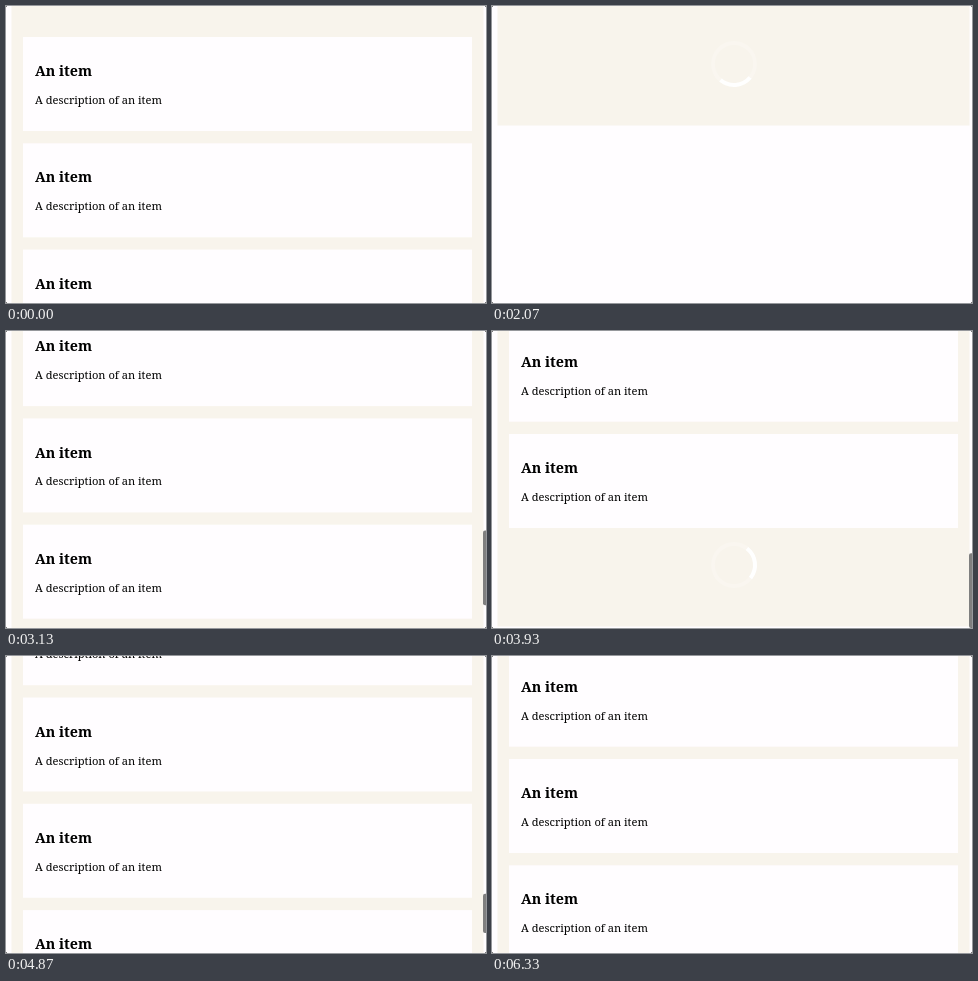
Animation, 480 px wide and 297 px high, one loop 6590 ms. Source, as an HTML page with a canvas:

```html
<!DOCTYPE html>
<html lang="en">
<head>
<meta charset="utf-8">
<title>Infinite scroll list</title>
<style>
  html, body { margin: 0; width: 100%; height: 100%; overflow: hidden; background: #fffdff; }
  canvas { display: block; }
</style>
</head>
<body>
<canvas id="stage" width="480" height="297"></canvas>
<script>
const ctx = document.getElementById('stage').getContext('2d');
const W = 480, H = 297, LOOP = 6590, TICK = 1000 / 15;
const CREAM = '#f8f4ec', WHITE = '#fffdff', INK = '#000';
const CARD = { x: 17, width: 449, height: 94, pitch: 106.3, first: 31 };
const FOOTER = 100;

// Scroll offset as [tick, pixels]: two flicks, each ending in a rubber-band bounce.
const SCROLL = [
  [39, 0], [40, 21.5], [41, 95], [43, 340], [45, 585], [47, 794],
  [48, 876], [49, 896], [51, 890], [54, 886], [57, 884.7],
  [64, 884.7], [65, 906], [66, 975], [71, 1580], [73, 1796.6],
  [74, 1890], [75, 1965], [76, 1967], [78, 1957], [80, 1951], [84, 1947.7]
];

function scrollAt(tick) {
  const next = SCROLL.findIndex(([at]) => at > tick);
  if (next === 0) return 0;
  if (next < 0) return SCROLL[SCROLL.length - 1][1];
  const [t0, y0] = SCROLL[next - 1], [t1, y1] = SCROLL[next];
  return y0 + (y1 - y0) * (tick - t0) / (t1 - t0);
}

const clamp = (v, lo, hi) => Math.min(hi, Math.max(lo, v));

function rect(color, x, y, w, h) {
  ctx.fillStyle = color;
  ctx.fillRect(x, y, w, h);
}

function text(string, font, x, y) {
  ctx.fillStyle = INK;
  ctx.font = font + ' "Noto Serif", serif';
  ctx.fillText(string, x, y);
}

function drawCard(y) {
  rect(WHITE, CARD.x, y, CARD.width, CARD.height);
  text('An item', 'bold 14.3px', 29, y + 39.1);
  text('A description of an item', '500 11.1px', 29, y + 67);
}

function drawSpinner(y, turn) {
  const arc = (color, from, to) => {
    ctx.strokeStyle = color;
    ctx.beginPath();
    ctx.arc(242, y, 21, from, to);
    ctx.stroke();
  };
  const middle = Math.PI * (1 + 2 * turn);
  ctx.lineWidth = 4;
  arc('rgba(255,255,255,.2)', 0, 2 * Math.PI);
  arc('#fff', middle - Math.PI / 4, middle + Math.PI / 4);
}

function drawThumb(scroll, page, alpha) {
  const height = H * H / page;
  const top = clamp(scroll / page * H, 0, H - height);
  ctx.globalAlpha = alpha;
  ctx.fillStyle = '#7f7f7f';
  ctx.beginPath();
  ctx.roundRect(477, top, 5, height, 2);
  ctx.fill();
  ctx.globalAlpha = 1;
}

function draw(ms) {
  const tick = Math.floor((ms + 4) / TICK);
  const time = tick * TICK;
  const loading = tick >= 20 && tick < 34;
  const count = loading ? 0 : tick < 63 ? 10 : tick < 89 ? 20 : 30;
  const scroll = scrollAt(tick);
  const listEnd = loading ? 21 : CARD.first + CARD.pitch * (count - 1) + CARD.height;

  rect(WHITE, 0, 0, W, H);
  rect(CREAM, 5.5, 0, 472, listEnd + FOOTER - 1.5 - scroll);
  for (let i = 0; i < count; i++) {
    const y = CARD.first + CARD.pitch * i - scroll;
    if (y > -CARD.height && y < H) drawCard(y);
  }
  drawSpinner(listEnd + 37 - scroll, (time - (loading ? 1257 : 2304)) / 1100);

  const alpha = tick < 41 ? 0 : clamp((95 - tick) / 3, 0, 1);
  drawThumb(scroll, listEnd + FOOTER, alpha);

  for (const x of [0, W - 1])
    for (const y of [0, H - 1]) rect('#777', x, y, 1, 1);
}

const start = performance.now();
function frame() {
  draw((performance.now() - start) % LOOP);
  requestAnimationFrame(frame);
}
frame();
</script>
</body>
</html>
```
